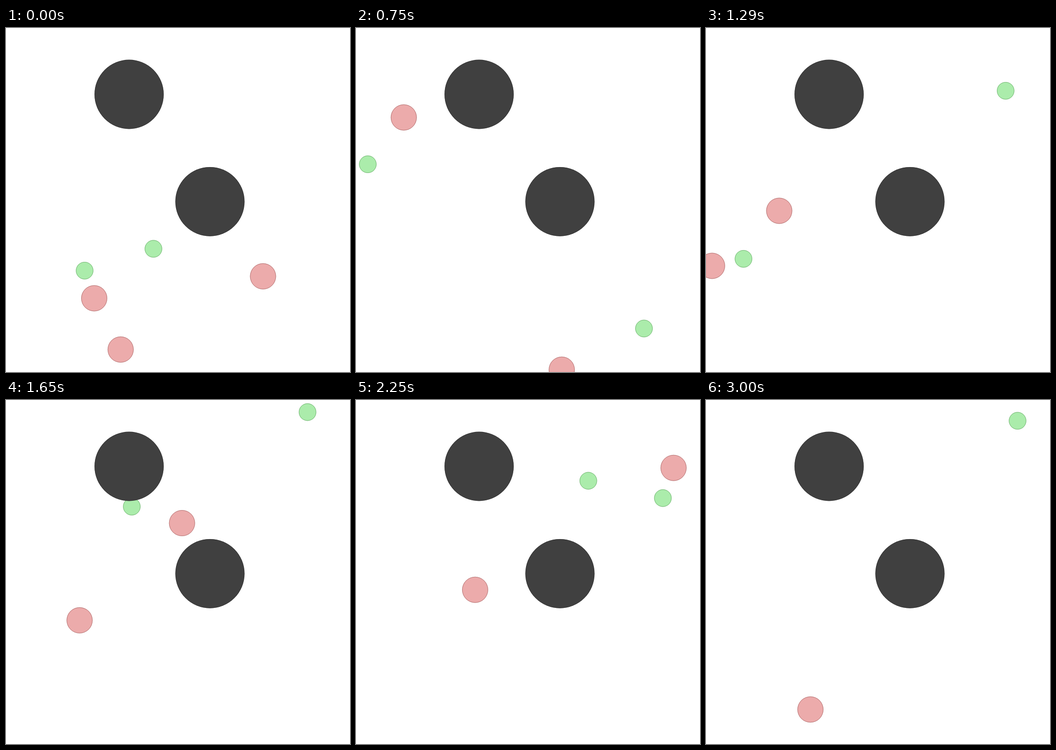
An HTML page with a canvas for the animation above (3.03 s loop, 700 by 700 pixels).

```html
<!DOCTYPE html>
<html lang="en">
<head>
<meta charset="utf-8">
<title>Pursuit</title>
<style>
html, body { margin: 0; width: 100%; height: 100%; overflow: hidden; background: #fff; }
canvas { display: block; }
</style>
</head>
<body>
<canvas id="stage" width="700" height="700"></canvas>
<script>
const ctx = document.getElementById('stage').getContext('2d');
const STEP = 30, STEPS = 101;

const look = (r, rgb, alpha) => ({
  r,
  fill: `rgba(${rgb},${alpha})`,
  line: `rgba(${rgb.map(c => c >> 1)},.42)`
});
const RED = look(26.5, [217, 89, 89], .5);
const GREEN = look(17.8, [89, 217, 89], .5);
const DARK = look(70.4, [64, 64, 64], 1);

// Every agent steers through its key points at these steps, until its list ends off stage
const KEYS = [0, 12, 25, 43, 67, 83, 100];
const agents = [
  { kind: RED, path: [[179.5, 550], [179.5, 142.3], [97.2, 182], [149, 372], [579, 113.3], [685.3, 201.5], [790, 290]] },
  { kind: RED, path: [[233.3, 654.3], [83, 557], [-50, 512], [12.3, 484], [268.6, 413.3], [191.5, 394.3], [212.5, 629.8]] },
  { kind: RED, path: [[523, 505.3], [555.7, 606.3], [418.7, 695.3], [300, 760]] },
  { kind: GREEN, path: [[300, 449.3], [445, 616.5], [586, 611.5], [609.7, 127.7], [616.5, 36], [632.3, 342.5], [634, 42.3]] },
  { kind: GREEN, path: [[160, 493.7], [24.5, 16.5], [24, 277.3], [76.3, 469.7], [440, -6.5], [501.7, 395], [760, 425]] }
];
const discs = [[250.5, 135], [415, 353.3]];

function slope(path, i, k) {
  const a = Math.max(i - 1, 0), b = Math.min(i + 1, path.length - 1);
  return (path[b][k] - path[a][k]) / (KEYS[b] - KEYS[a]);
}

// Cubic Hermite curve through the key points
function place(path, step) {
  const i = Math.max(KEYS.findIndex(s => s >= step) - 1, 0);
  if (i + 1 >= path.length) return path[path.length - 1];
  const d = KEYS[i + 1] - KEYS[i], u = (step - KEYS[i]) / d, w = 1 - u;
  const ease = u * u * (3 - 2 * u);
  return [0, 1].map(k => {
    const a = path[i][k], b = path[i + 1][k];
    const out = slope(path, i, k) * d, into = slope(path, i + 1, k) * d;
    return a + (b - a) * ease + out * u * w * w - into * u * u * w;
  });
}

function circle({ r, fill, line }, x, y) {
  ctx.beginPath();
  ctx.arc(x, y, r, 0, Math.PI * 2);
  ctx.fillStyle = fill;
  ctx.fill();
  ctx.beginPath();
  ctx.arc(x, y, r - .5, 0, Math.PI * 2);
  ctx.strokeStyle = line;
  ctx.stroke();
}

function draw(step) {
  ctx.clearRect(0, 0, 700, 700);
  for (const { kind, path } of agents) circle(kind, ...place(path, step));
  for (const [x, y] of discs) circle(DARK, x, y);
}

const start = performance.now();
function tick() {
  draw(Math.floor((performance.now() - start) / STEP) % STEPS);
  requestAnimationFrame(tick);
}
tick();
</script>
</body>
</html>
```
